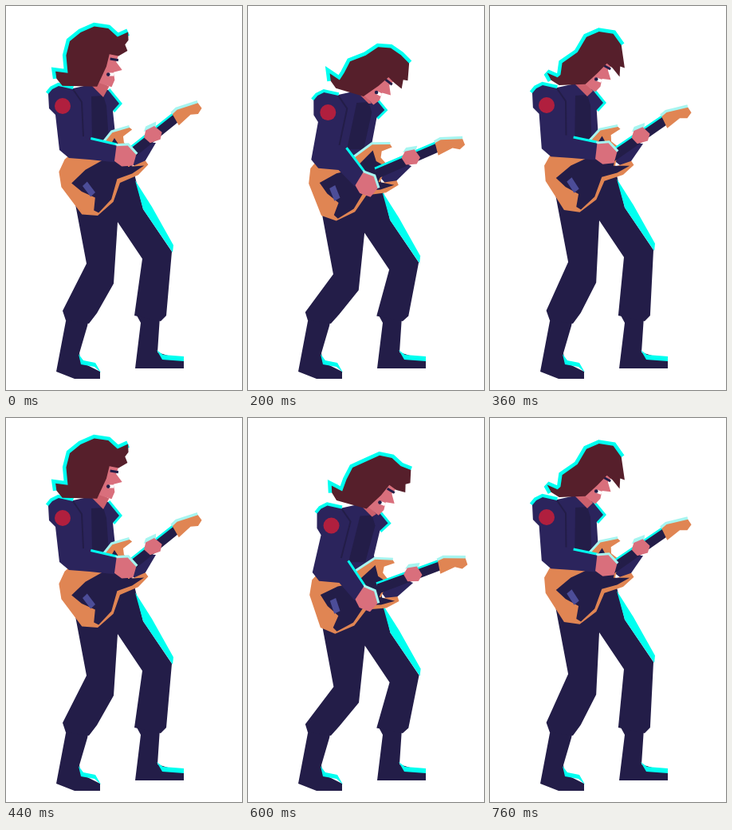
Write an HTML page with a canvas that moves like this. It is 296 px wide and 480 px high and loops after 0.8 s.

```html
<!DOCTYPE html>
<html>
<head>
<meta charset="utf-8">
<style>
  html, body { margin: 0; width: 100%; height: 100%; overflow: hidden; background: #fff; }
  canvas { display: block; }
</style>
</head>
<body>
<canvas id="stage" width="296" height="480"></canvas>
<script>
const ctx = document.getElementById('stage').getContext('2d');
const CYAN = '#00fff0', PALE = '#a6f5f0', NAVY = '#231d48', JACKET = '#2b245c', SKIN = '#d96f7c',
  NECK = '#cc606c', HAIR = '#561f2b', ORANGE = '#e08553', PURPLE = '#4c4d98', RED = '#b01f3e';

// Key poses: leaning back, lunging, head down, swinging up.
const KEYS = [0, 2, 7, 9], BEAT = 11, STEP = 40;
const RIG = {
  chest: [[0, 0], [28, 8], [16, 4], [0, -1]],
  pelvis: [[0, 0], [5, 11], [3, 8], [-3, -2]],
  head: [[117, 70, -8], [150, 80, 0], [147, 86, 25], [128, 73, 12]],
  swing: [[0], [0], [1], [1]],
  hand: [[149, 187], [149, 218], [148, 208], [145, 184]],
  guitar: [[104, 229, -36.9], [108, 234, -20.8], [107, 230, -28.2], [104, 224, -32.7]]
};

const points = s => s.split(' ').map(p => p.split(',').map(Number));

// Body shapes, bent by chest and pelvis.
const pants = points('84,232 101,322 71,381 75,393 104,397 114,384 135,347 140,270 171,316 161,387 194,394 201,387 208,307 172,254 158,198');
const thighRim = points('162,218 183,251 210,299 209,308 172,254');
const torso = points('84,103 107,98 128,105 142,122 134,131 137,160 160,205 160,225 88,225');
const shirt = points('107,113 122,112 126,125 129,168 108,168');
const upperArm = points('79,190 67,180 62,136 54,128 53,110 58,104 66,100 84,104 95,120 97,163 106,167');
const underElbow = points('105,192');
const collar = points('122,114 107,99');

const leftBoot = points('78,385 75,394 63,457 86,466 118,466 118,457 94,445 92,434 102,400 105,385');
const rightBoot = points('163,385 169,396 162,453 223,453 223,443 190,433 193,388');
const leftToe = points('91,435 97,443 112,446 119,458 111,451 94,448');
const rightToe = points('189,430 197,436 223,438 223,444 196,442');

// Head shapes around the middle of the head.
const hairBack = points('-40,-14 -33,-31 -18,-40 0,-45 17,-40 27,-28 41,-32 40,-22 35,-17 37,-9 25,-4 14,-8 8,7 -7,30 -50,23 -56,13 -56,4 -41,8');
const hairForward = points('-36,21 -37,6 -21,-11 -14,-32 0,-42 18,-43 31,-31 41,-4 35,-5 37,8 26,-1 18,-5 9,9 -3,26 -35,34 -46,30 -53,22 -39,25');
const face = points('25,-5 21,3 27,14 16,15 16,25 11,33 -4,26 -7,18 7,5 14,-9');
const neckTop = points('-7,22 8,32');
const brow = points('14,-2 24,1');
const mouth = points('9,17 16,18');

const hand = points('-13,-10 2,-13 14,-3 12,11 -2,14 -13,8');
const wrist = points('-12,-11 -12,10');

// Guitar shapes: origin at the pickup, x along the neck.
const body = points('-17,-40 -2,-48 9,-49 39,-32 66,-39 87,-31 88,-27 74,-27 70,-20 74,-9 57,9 78,14 78,20 60,23 36,17 15,31 -11,33 -26,20 -26,-23');
const guard = points('-13,-19 11,-22 34,-19 64,-32 63,-18 71,-8 56,7 73,18 55,17 36,11 15,27 -8,31 -11,25 0,13 -9,-3');
const sleeve = points('60,2 92,-4 102,4 66,19');
const fretboard = points('58,-9 142,-11 142,0 58,3');
const headstock = points('140,-12 148,-13 174,-4 174,4 166,7 158,2 138,4');
const pickup = points('-4,-8 4,-9 4,8 -4,9');
const fretHand = points('101,-16 113,-14 116,-2 109,4 96,0 94,-10');
const knuckles = points('98,-16 104,-20 118,-17 114,-12');

// Smooth periodic curve through the key values.
function curve(v, u) {
  const i = KEYS.findLastIndex(k => k <= u);
  const key = n => KEYS[(n + 4) % 4] + BEAT * Math.floor(n / 4);
  const val = n => v[(n + 4) % 4];
  const rate = n => (val(n + 1) - val(n)) / (key(n + 1) - key(n));
  const slope = n => {
    const before = key(n) - key(n - 1), after = key(n + 1) - key(n);
    return (rate(n - 1) * after + rate(n) * before) / (before + after);
  };
  const h = key(i + 1) - key(i), s = (u - key(i)) / h, r = 1 - s;
  return val(i) * (1 + 2 * s) * r * r + val(i + 1) * s * s * (3 - 2 * s)
    + h * s * r * (slope(i) * r - slope(i + 1) * s);
}

function rigAt(u) {
  const rig = {};
  for (const name in RIG) rig[name] = RIG[name][0].map((_, k) => curve(RIG[name].map(p => p[k]), u));
  return rig;
}

const mix = (a, b, t) => a + (b - a) * t;
const fade = (from, to, y) => Math.min(1, Math.max(0, (to - y) / (to - from)));

// The chest shift fades out at the waist, the pelvis shift from knee to ankle.
function bend(pts, { chest, pelvis }) {
  return pts.map(p => p.map((c, k) =>
    c + mix(pelvis[k], chest[k], fade(125, 200, p[1])) * fade(320, 390, p[1])));
}

function place(pts, [x, y, degrees]) {
  const c = Math.cos(degrees * Math.PI / 180), s = Math.sin(degrees * Math.PI / 180);
  return pts.map(([px, py]) => [x + px * c - py * s, y + px * s + py * c]);
}

function trace(pts) {
  ctx.beginPath();
  pts.forEach(p => ctx.lineTo(...p));
}
function fill(pts, color) {
  trace(pts);
  ctx.fillStyle = color;
  ctx.fill();
}
function line(pts, color, width) {
  trace(pts);
  ctx.strokeStyle = color;
  ctx.lineWidth = width;
  ctx.stroke();
}
function disc(x, y, radius, color) {
  ctx.beginPath();
  ctx.arc(x, y, radius, 0, 7);
  ctx.fillStyle = color;
  ctx.fill();
}

function drawBody(rig) {
  const chest = bend(torso, rig);
  line(chest.slice(2, 5), CYAN, 6);
  fill(chest, JACKET);
  fill(bend(shirt, rig), NAVY);
  fill(leftBoot, NAVY);
  fill(rightBoot, NAVY);
  fill(leftToe, CYAN);
  fill(rightToe, CYAN);
  fill(bend(pants, rig), NAVY);
  fill(bend(thighRim, rig), CYAN);
}

function drawGuitar(rig) {
  const at = pts => place(pts, rig.guitar);
  fill(at(sleeve), JACKET);
  line(at(body.slice(3, 6)), PALE, 6);
  fill(at(body), ORANGE);
  fill(at(guard), NAVY);
  line(at(fretboard.slice(0, 2)), CYAN, 5);
  fill(at(fretboard), NAVY);
  line(at(headstock.slice(0, 3)), PALE, 7);
  fill(at(headstock), ORANGE);
  fill(at(pickup), PURPLE);
  fill(at(knuckles), PALE);
  fill(at(fretHand), SKIN);
}

function drawArm(rig) {
  const [[ex, ey], [bx, by]] = bend([[82, 178], [71, 125]], rig), [hx, hy] = rig.hand;
  const grip = [hx, hy, Math.atan2(hy - ey, hx - ex) * 180 / Math.PI];
  const upper = bend(upperArm, rig), cuff = place(wrist, grip), fist = place(hand, grip);
  line(upper.slice(4, 8), CYAN, 8);
  line([upper.at(-1), cuff[0]], CYAN, 6);
  line(fist.slice(0, 3), PALE, 6);
  fill(fist, SKIN);
  fill([...upper, ...cuff, ...bend(underElbow, rig)], JACKET);
  line(upper.slice(7, 10), NAVY, 2);
  disc(bx, by, 10, RED);
}

function drawHead(rig) {
  const at = pts => place(pts, rig.head);
  const hair = at(hairBack.map((p, i) => p.map((c, k) => mix(c, hairForward[i][k], rig.swing[0]))));
  const teeth = at(mouth);
  line([...hair.slice(15), ...hair.slice(0, 7)], CYAN, 9);
  fill([...at(neckTop), ...bend(collar, rig)], NECK);
  fill(at(face), SKIN);
  line(teeth, '#fff', 4);
  disc(...teeth[0], 2.3, NAVY);
  line(at(brow), NAVY, 3);
  fill(hair, HAIR);
}

// Two beats share 20 slots; each beat skips a step.
function beatAt(ms) {
  const slot = Math.floor(ms % 800 / STEP);
  if (slot < 2) return 0;
  if (slot < 11) return slot;
  return slot < 16 ? slot - 11 : slot - 10;
}

function frame() {
  const rig = rigAt(beatAt(performance.now()));
  ctx.clearRect(0, 0, 296, 480);
  ctx.miterLimit = 3;
  for (const draw of [drawBody, drawGuitar, drawArm, drawHead]) draw(rig);
  requestAnimationFrame(frame);
}
frame();
</script>
</body>
</html>
```
